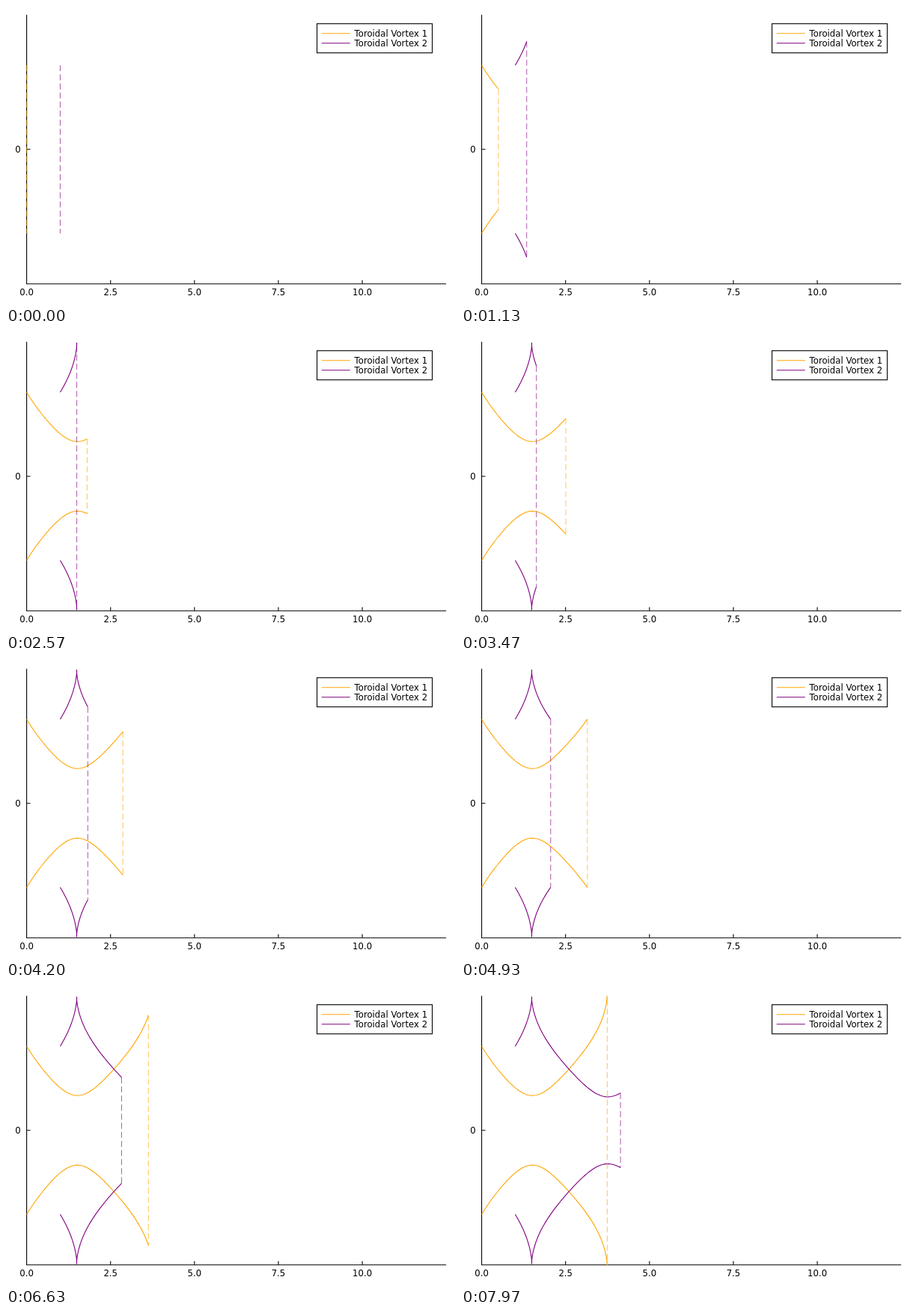
An HTML page that plays this animation: 600 by 400 pixels, repeating every 8 s.

```html
<!DOCTYPE html>
<html lang="en">
<head>
<meta charset="utf-8">
<title>Leapfrogging vortices</title>
<style>
html, body { margin: 0; width: 100%; height: 100%; overflow: hidden; background: #fff; }
svg { display: block; width: 600px; height: 400px; }
text { font: 11.7px "DejaVu Sans", sans-serif; fill: #000; }
.axis { fill: none; stroke: #000; stroke-width: 1.1; }
.trace { fill: none; stroke-width: 1.1; stroke-linejoin: round; }
.ring { stroke-width: 1.1; stroke-dasharray: 8.1 4.05; stroke-opacity: .6; }
</style>
</head>
<body>
<svg viewBox="0 0 600 400">
  <clipPath id="area"><rect x="27" y="11.6" width="561.4" height="360.4"/></clipPath>
  <rect width="600" height="400" fill="#fff"/>
  <g id="axes"><path class="axis" d="M27.6 11.8V371.8H588.2M27.6 191.7h5"/></g>
  <text x="19.6" y="196" text-anchor="end">0</text>
  <g id="plot" clip-path="url(#area)"></g>
  <rect class="axis" x="415.6" y="23.7" width="154" height="39" style="fill:#fff"/>
  <g id="legend"></g>
</svg>
<script>
const LEFT = 27.6, MID = 191.75, SX = 44.85, SY = 225;
const STEPS = 240, DT = 0.05, LOOP = 8000;
const COLORS = ['#ffa500', '#800080'];

function add(parent, tag, attrs, text = '') {
  const el = document.createElementNS('http://www.w3.org/2000/svg', tag);
  for (const key in attrs) el.setAttribute(key, attrs[key]);
  el.textContent = text;
  return document.getElementById(parent).appendChild(el);
}

// Velocity of ring p under its own mirror image and both halves of ring q.
function velocity(p, q) {
  const dx = p.x - q.x, dr = p.r - q.r, sum = p.r + q.r;
  const near = dx * dx + dr * dr, far = dx * dx + sum * sum;
  return {
    x: (1 / (2 * p.r) - dr / near + sum / far) / (2 * Math.PI),
    r: (dx / near - dx / far) / (2 * Math.PI)
  };
}

function advance(p, v) {
  return { x: p.x + v.x * DT, r: p.r + v.r * DT };
}

// Explicit Euler, both rings moved together.
const history = [[{ x: 0, r: 0.5 }, { x: 1, r: 0.5 }]];
while (history.length < STEPS) {
  const [a, b] = history[history.length - 1];
  history.push([advance(a, velocity(a, b)), advance(b, velocity(b, a))]);
}

for (let i = 0; i < 5; i++) {
  const x = LEFT + i * 2.5 * SX;
  if (i) add('axes', 'path', { class: 'axis', d: `M${x} 371.8v-5` });
  add('axes', 'text', { x, y: 387.4, 'text-anchor': 'middle' }, (i * 2.5).toFixed(1));
}

COLORS.forEach((stroke, i) => {
  const y = 36.8 + i * 13;
  add('legend', 'path', { class: 'trace', stroke, d: `M421.8 ${y}H459.8` });
  add('legend', 'text', { x: 465.6, y: y + 4.3 }, `Toroidal Vortex ${i + 1}`);
});

const traces = COLORS.map(stroke => add('plot', 'path', { class: 'trace', stroke }));
const rings = COLORS.map(stroke => add('plot', 'path', { class: 'ring', stroke }));

const px = p => (LEFT + p.x * SX).toFixed(2);
const py = (p, side) => (MID - side * p.r * SY).toFixed(2);

function draw(step) {
  const past = history.slice(0, step + 1);
  COLORS.forEach((_, i) => {
    const half = side => 'M' + past.map(s => `${px(s[i])} ${py(s[i], side)}`).join('L');
    const now = history[step][i];
    traces[i].setAttribute('d', step ? half(1) + half(-1) : '');
    rings[i].setAttribute('d', `M${px(now)} ${py(now, 1)}V${py(now, -1)}`);
  });
}

// Thirty steps a second, on a 10 ms clock.
const start = performance.now();
function tick() {
  const t = (performance.now() - start) % LOOP;
  draw(Math.floor((Math.floor(t / 10) * 10 + 5) * 0.03));
  requestAnimationFrame(tick);
}
tick();
</script>
</body>
</html>
```
